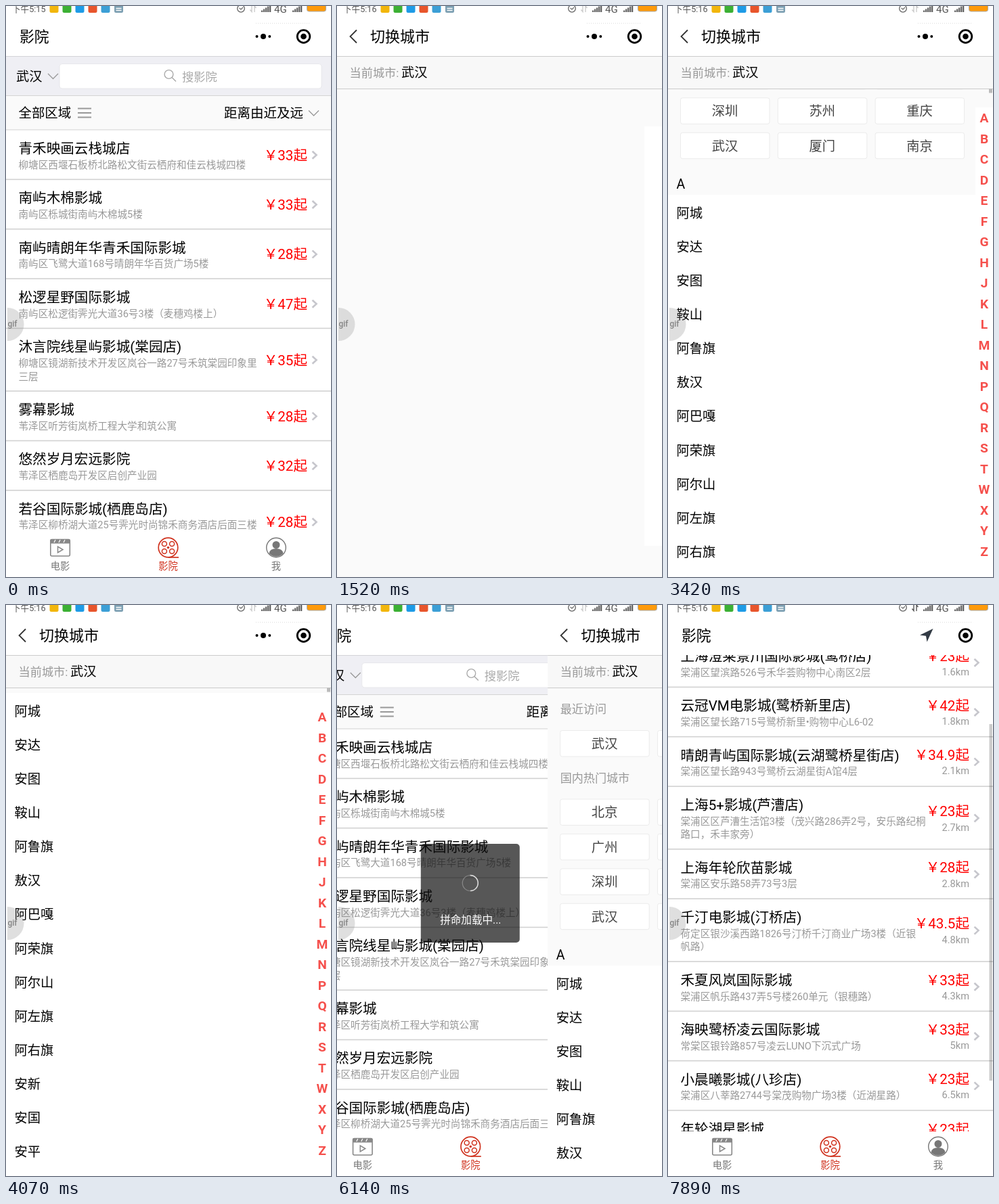
Write an HTML page that moves like this. It is 480 by 844 pixels and loops after 7990 ms.

```html
<!DOCTYPE html>
<html lang="zh-CN">
<head>
<meta charset="utf-8">
<title>影院</title>
<style>
html, body { margin: 0; width: 100%; height: 100%; overflow: hidden; background: #fff; }
svg { display: block; }
text { font-family: Roboto, "Noto Sans CJK SC", "Noto Sans CJK", sans-serif; white-space: pre; }
</style>
</head>
<body>
<svg id="stage" width="480" height="844" viewBox="0 0 480 844"></svg>
<script>
const LOOP = 7990;
const GREY = '#999', RED = '#d0331f';

// y is the optical middle of the line
const text = (x, y, size, str, fill = '#000', anchor = 'start', extra = '') =>
  `<text x="${x}" y="${(y + size * 0.38).toFixed(2)}" font-size="${size}" fill="${fill}" text-anchor="${anchor}" ${extra}>${str}</text>`;
const rect = (x, y, w, h, fill, extra = '') =>
  `<rect x="${x}" y="${y}" width="${w}" height="${h}" fill="${fill}" ${extra}/>`;
const line = (d, color, width = 1.5) =>
  `<path d="${d}" fill="none" stroke="${color}" stroke-width="${width}"/>`;
const dot = (x, y, r, fill, extra = '') =>
  `<circle cx="${x}" cy="${y}" r="${r}" fill="${fill}" ${extra}/>`;
const ring = (x, y, r, color, width) =>
  dot(x, y, r, 'none', `stroke="${color}" stroke-width="${width}"`);
const group = (id, body) => `<g id="${id}">${body}</g>`;
const clip = (y, h, body) =>
  `<svg x="0" y="${y}" width="480" height="${h}" viewBox="0 ${y} 480 ${h}">${body}</svg>`;

// name, price, address lines, distance
const wuhan = [
  ['青禾映画云栈城店', 33, '柳塘区西堰石板桥北路松文街云栖府和佳云栈城四楼'],
  ['南屿木棉影城', 33, '南屿区栎城街南屿木棉城5楼'],
  ['南屿晴朗年华青禾国际影城', 28, '南屿区飞鹭大道168号晴朗年华百货广场5楼'],
  ['松逻星野国际影城', 47, '南屿区松逻街霁光大道36号3楼（麦穗鸡楼上）'],
  ['沐言院线星屿影城(棠园店)', 35, '柳塘区镜湖新技术开发区岚谷一路27号禾筑棠园印象里|三层'],
  ['雾幕影城', 28, '苇泽区听芳街岚桥工程大学和筑公寓'],
  ['悠然岁月宏远影院', 32, '苇泽区栖鹿岛开发区启创产业园'],
  ['若谷国际影城(栖鹿岛店)', 28, '苇泽区柳桥湖大道25号霁光时尚锦禾商务酒店后面三楼|（西侧）']
];
const shanghai = [
  ['上海澄莱景川国际影城(鹭桥店)', 23, '棠浦区望滨路526号禾华荟购物中心南区2层', 1.6],
  ['云冠VM电影城(鹭桥新里店)', 42, '棠浦区望长路715号鹭桥新里•购物中心L6-02', 1.8],
  ['晴朗青屿国际影城(云湖鹭桥星街店)', 34.9, '棠浦区望长路943号鹭桥云湖星街A馆4层', 2.1],
  ['上海5+影城(芦漕店)', 23, '棠浦区区芦漕生活馆3楼（茂兴路286弄2号，安乐路纪桐|路口，禾丰家旁）', 2.7],
  ['上海年轮欣苗影城', 28, '棠浦区安乐路58弄73号3层', 2.8],
  ['千汀电影城(汀桥店)', 43.5, '荷定区银沙溪西路1826号汀桥千汀商业广场3楼（近银|帆路）', 4.8],
  ['禾夏风岚国际影城', 33, '棠浦区帆乐路437弄5号楼260单元（银穗路）', 4.3],
  ['海映鹭桥凌云国际影城', 33, '常棠区银铃路857号凌云LUNO下沉式广场', 5],
  ['小晨曦影城(八珍店)', 23, '棠浦区八莘路2744号棠茂购物广场3楼（近湖星路）', 6.5],
  ['年轮湖星影城', 23, '棠浦区湖星路318号2层', 6.8]
];

function cinemaList(rows) {
  let y = 183, out = '';
  for (const [name, price, address, km] of rows) {
    const lines = address.split('|');
    const h = lines.length > 1 ? 92.8 : 73.35, mid = y + h / 2;
    out += text(18.5, y + 27, 20.6, name);
    lines.forEach((s, i) => out += text(18.5, y + 51 + i * 19.7, 14.6, s, GREY));
    out += text(445, km ? mid - 10 : mid, 20.6, `￥${price}起`, '#f00', 'end');
    if (km) out += text(445, mid + 13.5, 14.6, km + 'km', GREY, 'end');
    out += line(`M452.5 ${mid - 5}l6 5.5l-6 5.5`, '#c6c6cc', 2.6);
    y += h;
    out += rect(0, y - 0.8, 480, 1.6, '#d2d2d2');
  }
  return out;
}

const capsule = id =>
  `<path d="M369 25.5H448" stroke="#ddd" stroke-dasharray="1 2"/>` +
  group(id, dot(370.5, 45, 2, '#000') + dot(380, 45, 4, '#000') + dot(389.3, 45, 2, '#000')) +
  ring(439.5, 45, 9.3, '#000', 2.8) + dot(439.5, 45, 4.3, '#000');

const tabs = rect(0, 778, 480, 66, '#fff') +
  `<rect x="65.8" y="788.5" width="28.5" height="24.5" rx="2" fill="none" stroke="#888" stroke-width="1.6"/>` +
  rect(65.5, 788, 29, 6.5, '#888', 'rx="1.5"') +
  line('M71 793l2-4M78 793l2-4M85 793l2-4', '#fff', 1.2) +
  `<path d="M76.5 799v9l7.5-4.5z" fill="none" stroke="#888" stroke-width="1.5"/>` +
  ring(239.5, 800.5, 14.3, RED, 1.7) + dot(239.5, 800.5, 1.8, RED) +
  [[-1, -1], [1, -1], [-1, 1], [1, 1]].map(([a, b]) => ring(239.5 + a * 5.6, 800.5 + b * 5.6, 3.5, RED, 1.5)).join('') +
  line('M240 815H255', RED, 1.7) +
  ring(399, 800.5, 14.3, '#777', 1.4) + dot(399, 796.5, 5.5, '#777') +
  '<path d="M388.5 809q1-7 10.5-7t10.5 7a14 14 0 0 1-21 0z" fill="#777"/>' +
  text(80, 828, 14.3, '电影', '#777', 'middle') +
  text(239.5, 828, 14.3, '影院', RED, 'middle') +
  text(399, 828, 14.3, '我', '#777', 'middle');

const toast = rect(166, 353, 146, 146, '#111', 'rx="5" opacity=".7"') +
  `<circle cx="239" cy="411" r="11.5" fill="none" stroke="#fff" stroke-opacity=".3" stroke-width="1.2"/>` +
  group('spin', line('M239 399.5a11.5 11.5 0 0 1 0 23', '#ddd', 1.5)) +
  text(239.5, 465.5, 15.6, '拼命加载中...', '#fff', 'middle');

const home = rect(0, 0, 480, 844, '#fff') +
  clip(74, 704, group('homeScroll',
    rect(0, 74, 480, 58, '#efeff4') + rect(0, 74, 480, 1, '#d4d4d8') +
    text(15, 104, 19.2, '武汉', '#000', 'start', 'id="town"') +
    line('M62 100l7.5 7.5l7.5-7.5', GREY, 1.3) +
    rect(79, 85.5, 387, 36.5, '#fff', 'rx="4" stroke="#e4e4e8" stroke-width=".8"') +
    ring(240.5, 101, 6.4, '#aaa', 1.4) + line('M245 105.5l6 6', '#aaa', 1.5) +
    text(260, 104.5, 17.3, '搜影院', '#aaa') +
    rect(0, 132, 480, 51, '#fafafa') + rect(0, 132, 480, 1, '#d4d4d4') + rect(0, 182.5, 480, 1, '#d4d4d4') +
    text(18.5, 158, 19.4, '全部区域') +
    line('M106 151.5h20M106 158h20M106 164.5h20', '#999', 1.8) +
    text(322, 158, 19.5, '距离由近及远') +
    line('M447 154.5l7.5 7.5l7.5-7.5', GREY, 1.3) +
    group('listA', cinemaList(wuhan)) + group('listB', cinemaList(shanghai))) +
    rect(474.5, 0, 4.5, 527, '#000', 'id="homeBar" opacity=".2"')) +
  rect(0, 0, 480, 74, '#fff') + text(20, 45, 21.8, '影院') + capsule('dots') +
  group('arrow', '<path d="M372 44.5L391.5 35L382.5 54.5L381 45.8z" fill="#333b45"/>') +
  tabs + group('toast', toast);

const hot = ['北京 上海 天津', '广州 成都 杭州', '深圳 苏州 重庆', '武汉 厦门 南京'];
const towns = '阿城 安达 安图 鞍山 阿鲁旗 敖汉 阿巴嘎 阿荣旗 阿尔山 阿左旗 阿右旗 安新 安国 安平 安阳 安庆'.split(' ');
const boxRow = (names, y) => names.split(' ').map((s, i) =>
  rect(18.5 + i * 143.8, y + 0.5, 131.5, 38.5, '#fff', 'rx="3" stroke="#ebebeb"') +
  text(84 + i * 143.8, y + 19.5, 19.3, s, '#444', 'middle')).join('');

const cityList = text(18.5, 153.5, 17.1, '最近访问', GREY) + boxRow('武汉 上海 南京', 185) +
  text(18.5, 255, 17.1, '国内热门城市', GREY) +
  hot.map((s, i) => boxRow(s, 286.5 + i * 51.4)).join('') +
  text(12.5, 516.5, 19.5, 'A') + rect(0, 533, 480, 900, '#fff') +
  towns.map((s, i) => text(12.5, 559.5 + i * 50.1, 19.3, s)).join('');

const letters = [...'ABCDEFGHJKLMNPQRSTWXYZ'].map((c, i) =>
  text(467, 164.7 + i * 30.52, 19.2, c, '#f5504c', 'middle', 'font-weight="700"')).join('');

const city = rect(0, 0, 480, 844, '#fafafa') +
  group('empty', rect(454, 178, 26, 620, '#fff')) +
  group('loaded', clip(123, 721, group('cityScroll', cityList)) +
    rect(454, 150, 26, 672, '#fff') + letters) +
  rect(0, 74, 480, 49, '#f8f8f8') + rect(0, 74, 480, 1, '#ccc') + rect(0, 122, 480, 1, '#ccc') +
  rect(474, 122.5, 5, 6, '#bbb', 'id="thumb"') +
  text(18.5, 98.5, 17.2, '当前城市:', GREY) + text(95, 98, 19.2, '武汉') +
  rect(475, 74, 4, 721, '#000', 'id="cityBar"') +
  '<path id="glow" d="M0 0V49Q240 114 480 49V0z" opacity=".3"/>' +
  rect(0, 0, 480, 74, '#fff') + line('M29 35.5l-9.5 9.5l9.5 9.5', '#333', 1.8) +
  text(49, 45, 22, '切换城市') + capsule('cityDots');

const signal = x => [0, 1, 2, 3, 4].map(i =>
  rect(x + i * 3, 6.5 - i * 2, 2.3, 2.5 + i * 2, '#666')).join('');
const status = rect(0, 0, 480, 14, '#fff') +
  text(9, 4, 12.6, '下午5:15', '#555', 'start', 'id="clock"') +
  ['#f2b60c', '#3cb034', '#1e9be6', '#e8552c', '#3c9fd6'].map((c, i) =>
    rect(64.5 + i * 19, -3, 13, 13, c, 'rx="2.5"')).join('') +
  rect(160, -3, 13, 13, '#7c9fb2', 'rx="2.5"') + line('M162.5 3.5h8M162.5 6.5h8', '#fff', 1.4) +
  ring(347, 3.8, 5.3, '#666', 1.3) + line('M344.5 3l2.5 2l3-3', '#666', 1.2) +
  `<path id="data" d="M363 -1V8.5l-2.5-3M367 9V0l2.5 3" fill="none" stroke-width="1.4"/>` +
  signal(377) + text(396, 4, 15, '4G', '#555') + signal(423) +
  rect(444.5, -5, 28, 13, '#ff9a0a', 'rx="3" stroke="#aaa"');

const bubble = '<path d="M2 446a24.5 24.5 0 0 1 0 49z" fill="#808080" opacity=".25"/>' +
  text(2.5, 469.5, 12, 'gif', '#858585', 'start', 'font-weight="500"');

document.getElementById('stage').innerHTML =
  group('home', home) + group('city', city) + status + bubble;

const $ = id => document.getElementById(id);
const show = (id, on) => $(id).style.display = on ? '' : 'none';
const shift = (id, x, y) => $(id).setAttribute('transform', `translate(${x} ${y})`);

// the picture advances in steps: first, last, count
const ticks = [0];
for (const [a, b, n] of [[430, 430, 1], [1130, 1520, 5], [2350, 2350, 1], [2920, 3670, 9], [3770, 4070, 4],
  [4230, 5010, 9], [5100, 5570, 6], [6040, 6820, 9], [6920, 7700, 9], [7790, 7890, 2]])
  for (let i = 0; i < n; i++) ticks.push(n > 1 ? a + (b - a) * i / (n - 1) : a);

function track(t, keys) {
  let [t0, v0] = keys[0];
  for (const [t1, v1] of keys) {
    if (t < t1) return t <= t0 ? v0 : v0 + (v1 - v0) * (t - t0) / (t1 - t0);
    t0 = t1; v0 = v1;
  }
  return v0;
}
const unit = v => Math.min(1, Math.max(0, v));
const easeOut = (p, k) => 1 - (1 - unit(p)) ** k;

const cityKeys = [[2919, 0], [2920, 62], [3300, 230], [3670, 330], [3770, 348], [4070, 403],
  [4180, 403], [4230, 365], [4550, 120], [4720, 0]];
const homeKeys = [[7200, 0], [7600, 92], [7890, 135]];

function draw(t) {
  // the city page slides in, later back out
  const enter = easeOut((t - 1070) / 420, 2), leave = easeOut((t - 5987) / 300, 1.5);
  const cover = enter - leave;
  shift('home', -120 * cover, 0);
  shift('city', 480 * (1 - cover), 0);
  show('city', cover > 0);

  const ready = t >= 2350;
  show('empty', !ready);
  show('loaded', ready);
  shift('cityScroll', 0, -track(t, cityKeys));
  show('thumb', t >= 2920 && t < 5050);
  const glow = track(t, [[4680, 0], [4950, 1], [5010, 1], [5570, 0]]);
  $('glow').setAttribute('transform', `translate(0 74) scale(1 ${glow})`);
  $('glow').setAttribute('opacity', 0.3 * Math.min(1, glow * 1.5));
  $('cityBar').setAttribute('opacity', track(t, [[4680, 0], [4800, 0.12], [5100, 0.12], [5570, 0]]));

  const swapped = t >= 6700;
  show('listA', !swapped);
  show('listB', swapped);
  $('town').textContent = swapped ? '上海' : '武汉';
  show('toast', t >= 6000 && !swapped);
  $('spin').setAttribute('transform', `rotate(${(t - 6140) * 0.36} 239 411)`);
  const y = track(t, homeKeys);
  shift('homeScroll', 0, -y);
  show('homeBar', y > 0);
  $('homeBar').setAttribute('y', 74 + y * 102 / 135);

  const locating = t >= 6300;
  show('dots', !locating);
  show('arrow', locating);
  $('arrow').setAttribute('opacity', 0.7 + 0.3 * Math.cos((t - 7890) / 1000 * 2 * Math.PI));
  $('data').setAttribute('stroke', locating ? '#555' : '#ccc');
  $('clock').textContent = t < 430 ? '下午5:15' : '下午5:16';
}

let last = -1;
function frame() {
  const now = performance.now() % LOOP;
  const t = ticks.filter(v => v <= now).pop();
  if (t !== last) draw(last = t);
  requestAnimationFrame(frame);
}
frame();
</script>
</body>
</html>
```
